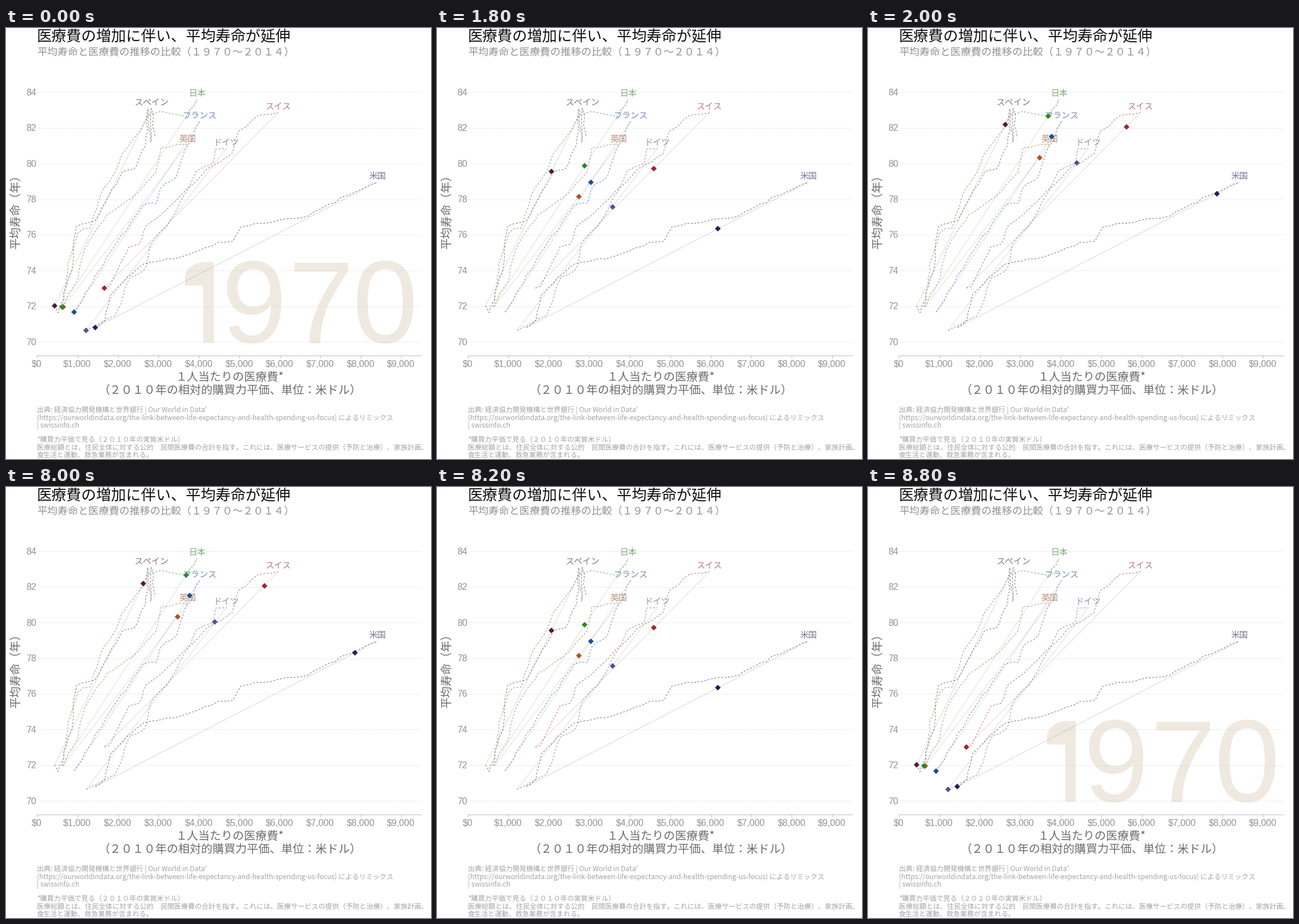
Animation of 743 by 754 pixels, one loop 10 s. Source, as a matplotlib script:

```python
import numpy as np
import matplotlib.pyplot as plt
from matplotlib.animation import FuncAnimation
from matplotlib.colors import to_rgb
from matplotlib.patches import Polygon

W, H, DPI = 743, 754, 100
PX = 72 / DPI
JP, SANS = "Noto Sans CJK JP", "Liberation Sans"
STEP_MS, FRAMES, MOVE = 200, 50, 5
INK, TICK, NOTE, AXIS, YEAR = "#6c6c6c", "#929292", "#a4a4a4", "#bdbdbd", "#efe9df"

rng = np.random.default_rng(4)
fig = plt.figure(figsize=(W / DPI, H / DPI), dpi=DPI, facecolor="white")
ax = fig.add_axes([0, 0, 1, 1])
ax.set(xlim=(0, W), ylim=(H, 0))
ax.axis("off")


def text(x, y, s, size, color, font=JP, ha="left", **kw):
    """Write s with its glyphs centred vertically on y."""
    drop = 0.38 if font == JP else 0.345
    return ax.text(x, y + drop * size, s, fontsize=size * PX, color=color,
                   family=font, ha=ha, va="baseline", parse_math=False, **kw)


def line(xs, ys, color, width=1, **kw):
    return ax.plot(xs, ys, color=color, lw=width * PX, **kw)[0]


def muted(color, share):
    """Blend a colour towards mid grey."""
    return (1 - share) * np.array(to_rgb(color)) + share * 0.5


# Headings
text(54, 13.5, "医療費の増加に伴い、平均寿命が延伸", 26.15, "#111111")
text(54, 41.5, "平均寿命と医療費の推移の比較（１９７０～２０１４）", 18, "#929292")

# Axes
for i in range(8):
    y = 549 - 62.36 * i
    line([55, 726], [y, y], "#cfcfcf", dashes=(1, 2), zorder=0.5)
    text(53, y, str(70 + 2 * i), 16, TICK, SANS, "right")
line([54, 726], [573, 573], AXIS)
for i in range(10):
    x = 54 + 70.75 * i
    line([x, x], [573, 577], AXIS)
    text(x, 587, f"${1000 * i:,}", 16, TICK, SANS, "center")
text(296, 609, "１人当たりの医療費*", 20, INK)
text(161, 632, "（２０１０年の相対的購買力平価、単位：米ドル）", 20, INK)
ax.text(22.5, 386, "平均寿命（年）", fontsize=20 * PX, color=INK, family=JP,
        rotation=90, rotation_mode="anchor", ha="left", va="baseline")

# Notes
notes = {
    667: "出典: 経済協力開発機構と世界銀行 | Our World in Data'",
    681: "(https://ourworldindata.org/the-link-between-life-expectancy-and-"
         "health-spending-us-focus) によるリミックス",
    694: "| swissinfo.ch",
    719: "*購買力平価で見る（２０１０年の実質米ドル）",
    733: "医療総額とは、住民全体に対する公的　民間医療費の合計を指す。"
         "これには、医療サービスの提供（予防と治療）、家族計画、",
    746: "食生活と運動、救急業務が含まれる。",
}
for y, note in notes.items():
    text(54, y, note, 12, NOTE)


def big_one(x, base=550.5):
    """A figure one without a foot, as a stem and a curved flag."""
    t = np.linspace(0, np.pi / 2, 12)
    flag = np.column_stack([x + 11 - 36 * np.sin(t), base - 114 - 27 * np.cos(t)])
    stem = [(x - 25, base - 100), (x + 7, base - 100), (x + 7, base),
            (x + 25, base), (x + 25, base - 141)]
    return ax.add_patch(Polygon([*flag, *stem], color=YEAR, lw=0, zorder=0.2))


def big_year(digits, centres):
    return [big_one(x) if d == "1" else
            ax.text(x, 550.5, d, fontsize=205 * PX, color=YEAR, family=SANS,
                    ha="center", va="baseline", zorder=0.2)
            for d, x in zip(digits, centres)]


first_year = big_year("1970", (338, 433, 551, 663))
last_year = big_year("2014", (354, 468, 558, 664))


def roughen(points, spacing=13, jitter=1.2):
    """Subdivide a polyline and shake the added points a little."""
    out = [points[0]]
    for a, b in zip(points, points[1:]):
        n = max(1, round(np.hypot(*(b - a)) / spacing))
        mid = a + (b - a) * np.arange(1, n)[:, None] / n
        out += [*(mid + rng.normal(0, jitter, mid.shape)), b]
    return np.array(out)


tracks = []


def country(name, color, start, end, bends, tail=()):
    """Add the dashed history, the straight trend, the label and the marker."""
    a, b = np.array(start), np.array(end)
    xs, ys = roughen(np.array([start, *bends, end, *tail], float)).T
    line([a[0], b[0]], [a[1], b[1]], muted(color, 0.5), 0.8, alpha=0.28)
    line(xs, ys, muted(color, 0.2), alpha=0.7, dashes=(3.2, 2.8),
         dash_capstyle="butt")
    text(b[0], b[1] - 11.5, name, 15, muted(color, 0.2), ha="center",
         alpha=0.68, zorder=3)
    dot, = ax.plot(*start, "D", color=color, ms=6.6 * PX, mew=0, zorder=4)
    tracks.append((dot, a, b))


country("スペイン", "#4f2028", (85, 486), (254, 141),
        [(91, 498), (115, 425), (123, 347), (156, 337), (204, 251), (224, 247),
         (244, 205), (248, 141), (253, 200)], tail=[(261, 192)])
country("英国", "#a8552a", (100, 488), (317.5, 204),
        [(123, 445), (134, 400), (152, 362), (177, 326), (220, 297), (262, 253),
         (271, 209)])
country("日本", "#2b8a26", (97.5, 488), (334, 125),
        [(108, 412), (126, 358), (147, 350), (166, 290), (192, 250), (202, 222),
         (237, 176), (249, 152), (270, 146), (315, 155)])
country("フランス", "#1f4e96", (119, 497), (339, 163),
        [(186, 387), (239, 310), (263, 307), (270, 281), (298, 260), (312, 215)])
country("スイス", "#a5232f", (172, 455), (476, 148),
        [(181, 452), (215, 383), (233, 378), (245, 346), (280, 318), (316, 282),
         (352, 246), (395, 220), (406, 181), (441, 153)])
country("ドイツ", "#584f95", (140, 529), (385, 211),
        [(191, 503), (217, 436), (240, 425), (254, 375), (281, 347), (317, 284),
         (333, 250), (362, 237), (366, 212)])
country("米国", "#231f57", (156, 524), (649, 270),
        [(173, 511), (182, 468), (212, 436), (240, 413), (308, 400), (371, 375),
         (397, 373), (411, 348), (528, 329), (600, 292)])


def ease(t):
    return 2 * t * t if t < 0.5 else 1 - 2 * (1 - t) ** 2


def update(k):
    step = min(max(min(k - 6, 44 - k), 0), MOVE)
    s = ease(step / MOVE)
    for dot, a, b in tracks:
        x, y = a + (b - a) * s
        dot.set_data([x], [y])
    for part in first_year:
        part.set_visible(step == 0)
    for part in last_year:
        part.set_visible(step == MOVE)
    return []


anim = FuncAnimation(fig, update, frames=FRAMES, interval=STEP_MS,
                     init_func=lambda: update(0), repeat=True, repeat_delay=0)
plt.show()
```
